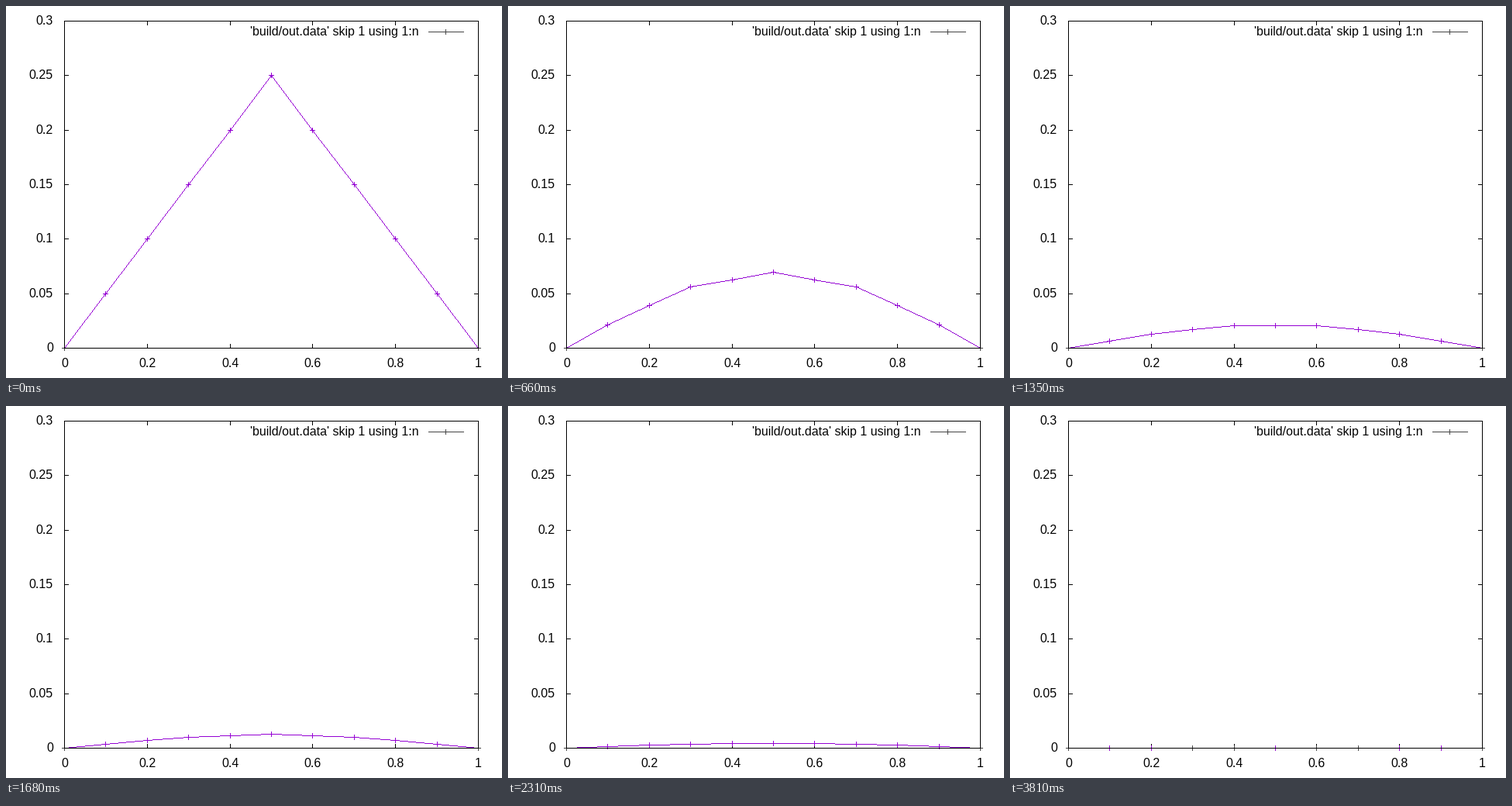
Recreate the animation shown at these times as a matplotlib script. Size 640x480 px, loop 6.03 s.

```python
import numpy as np
import matplotlib.pyplot as plt
from matplotlib.animation import FuncAnimation
from matplotlib.patches import PathPatch
from matplotlib.path import Path

W, H, DPI = 640, 480, 80
LEFT, RIGHT, TOP, BOTTOM = 75, 609, 19, 441
FRAMES, INTERVAL = 201, 30
PURPLE, GRAY = "#9400d3", "#444444"
TICK, ARM = 5, 3

plt.rcParams.update({
    "font.family": "Liberation Sans",
    "font.size": 16 * 72 / DPI,
    "text.hinting": "native",
})


def nearest(v):
    return np.floor(np.asarray(v) + 0.5).astype(int)


def col(x):
    return nearest(LEFT + (RIGHT - LEFT) * np.asarray(x))


def row(y):
    return BOTTOM - nearest((BOTTOM - TOP) * np.asarray(y) / 0.3)


def line(x0, y0, x1, y1):
    """Cells of a one-pixel line, stepping along its longer side."""
    a, b = np.array([x0, y0]), np.array([x1, y1])
    major = 0 if abs(x1 - x0) >= abs(y1 - y0) else 1
    if a[major] > b[major]:
        a, b = b, a
    n = max(b[major] - a[major], 1)
    steps = np.arange(n + 1)[:, None]
    d = b - a
    return a + np.sign(d) * nearest(steps * np.abs(d) / n)


def plus(x, y):
    return [line(x - ARM, y, x + ARM, y), line(x, y - ARM, x, y + ARM)]


def cells_path(parts):
    """One compound path with a unit square for every cell."""
    cells = np.concatenate(parts)
    square = np.array([[0, 0], [1, 0], [1, 1], [0, 1], [0, 0]])
    verts = (cells[:, None] + square).reshape(-1, 2)
    codes = [Path.MOVETO] + [Path.LINETO] * 3 + [Path.CLOSEPOLY]
    return Path(verts, np.tile(codes, len(cells)))


fig = plt.figure(figsize=(W / DPI, H / DPI), dpi=DPI, facecolor="white")
ax = fig.add_axes([0, 0, 1, 1])
ax.set_xlim(0, W)
ax.set_ylim(H, 0)
ax.axis("off")


def add_cells(parts, color, z):
    patch = PathPatch(cells_path(parts), fc=color, ec="none", lw=0,
                      antialiased=False, zorder=z)
    return ax.add_patch(patch)


# Heat equation on eleven points: each step averages the two neighbours.
grid = np.arange(11) / 10
heat = [np.minimum(grid, 1 - grid) / 2]
for _ in range(FRAMES - 1):
    u = np.zeros(11)
    u[1:-1] = (heat[-1][:-2] + heat[-1][2:]) / 2
    heat.append(u)
cols = col(grid)

# Axes
ticks = []
for i in range(6):
    c = int(col(i / 5))
    ticks += [line(c, TOP, c, TOP + TICK), line(c, BOTTOM - TICK, c, BOTTOM)]
    ax.text(c + 0.5, 466, f"{i / 5:g}", ha="center", va="baseline")
for i in range(7):
    r = int(row(i / 20))
    ticks += [line(LEFT, r, LEFT + TICK, r), line(RIGHT - TICK, r, RIGHT, r)]
    ax.text(61, r + 5, f"{i / 20:g}", ha="right", va="baseline")
add_cells(ticks, "black", 1)
add_cells([line(LEFT, TOP, RIGHT, TOP), line(LEFT, BOTTOM, RIGHT, BOTTOM),
           line(LEFT, TOP, LEFT, BOTTOM), line(RIGHT, TOP, RIGHT, BOTTOM)],
          "black", 4)

# Key
ax.text(423.5, 38, "'build/out.data' skip 1 using 1:n",
        ha="center", va="baseline")
add_cells([line(545, 33, 590, 33)] + plus(567, 33), GRAY, 2)


def curve_parts(k):
    """Purple and gray cells; resting markers on odd columns are gray."""
    rows = row(heat[k])
    pts = list(zip(cols, rows))
    bright = [line(*p, *q) for p, q in zip(pts, pts[1:])]
    dull = []
    for x, y in pts:
        resting = y == BOTTOM and x % 2 == 1
        (dull if resting else bright).extend(plus(x, y))
    return bright, dull


bright, dull = curve_parts(0)
curve = add_cells(bright, PURPLE, 2)
rest = add_cells(dull, GRAY, 3)


def update(k):
    bright, dull = curve_parts(k)
    curve.set_path(cells_path(bright))
    rest.set_path(cells_path(dull))
    return curve, rest


anim = FuncAnimation(fig, update, frames=FRAMES, interval=INTERVAL,
                     repeat=True, repeat_delay=0, blit=False)
plt.show()
```
